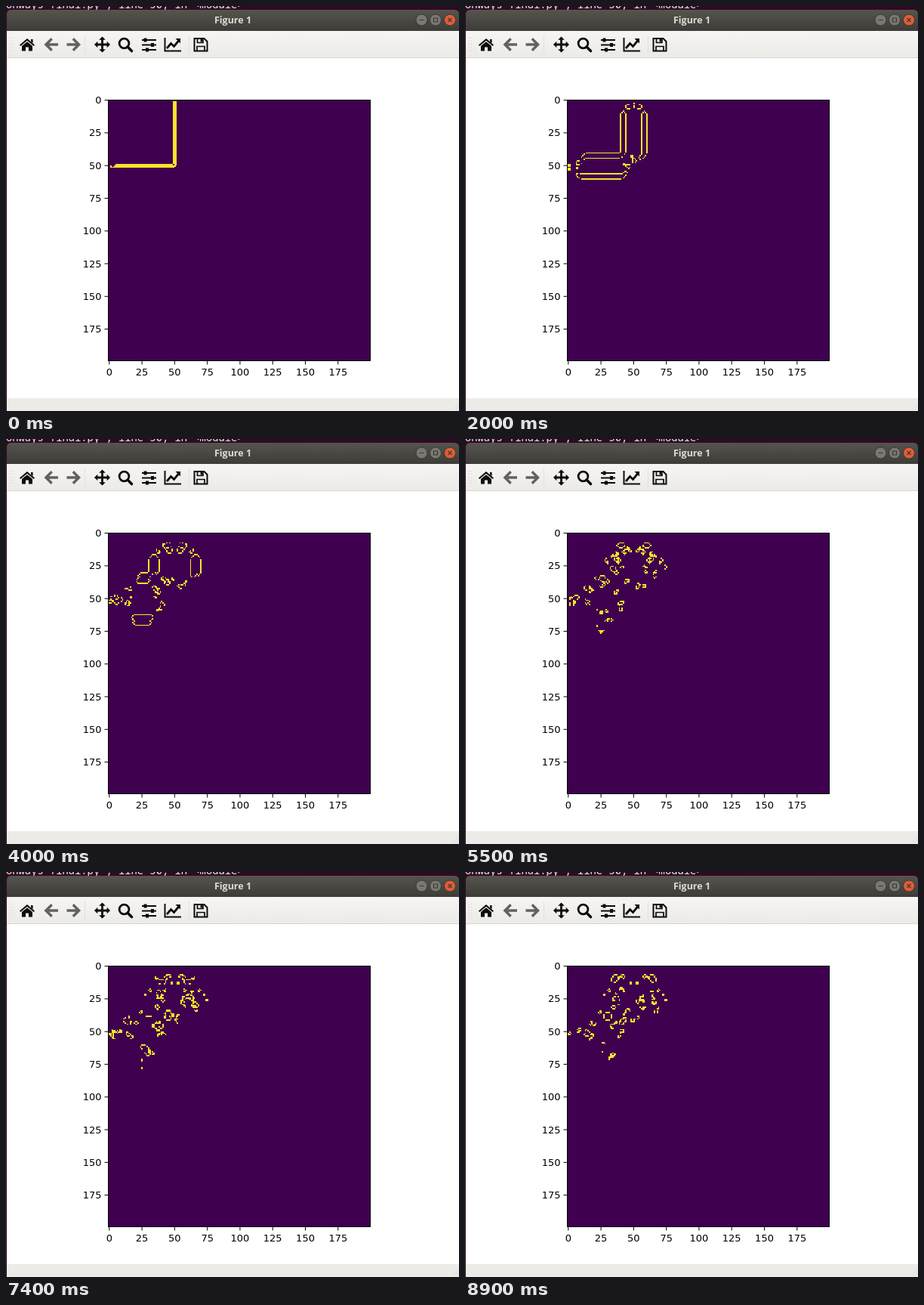
These frames come from a looping animation (600 px wide and 536 px high, 9000 ms). An HTML page with a canvas:

```html
<!DOCTYPE html>
<html lang="en">
<head>
<meta charset="utf-8">
<title>Figure 1</title>
<style>
  html, body { margin: 0; width: 100%; height: 100%; overflow: hidden; background: #300a24; }
  svg { position: absolute; left: 0; top: 0; }
  canvas { position: absolute; left: 135px; top: 124px; }
  .term { font: 13.8px "Noto Sans Mono", "DejaVu Sans Mono", monospace; fill: #eee; }
  .title { font: bold 12.5px "Open Sans", "Noto Sans", sans-serif; fill: #dfdbd2; text-anchor: middle; }
  #axes { font: 13px "DejaVu Sans", sans-serif; }
</style>
</head>
<body>
<svg width="600" height="536" viewBox="0 0 600 536">
  <defs>
    <linearGradient id="bar" x2="0" y2="1"><stop stop-color="#56544d"/><stop offset="1" stop-color="#3d3c38"/></linearGradient>
    <linearGradient id="tools" x2="0" y2="1"><stop stop-color="#f6f5f3"/><stop offset="1" stop-color="#eceae7"/></linearGradient>
  </defs>
  <rect width="600" height="536" fill="#300a24"/>
  <text class="term" x="0" y="3" xml:space="preserve">onways-final.py", line 50, in &lt;module&gt;</text>

  <!-- window -->
  <path d="M1 33V11Q1 5 7 5H594Q600 5 600 11V33Z" fill="url(#bar)"/>
  <text class="title" x="300.5" y="23">Figure 1</text>
  <g stroke="#3a3935" fill="#7a7872">
    <circle cx="550.5" cy="18.5" r="7.5"/><circle cx="569" cy="18.5" r="7.5"/>
    <circle cx="588" cy="18.5" r="7.5" fill="#e25c36"/>
    <path d="M547.5 18.5h6M566.5 16h5v5h-5zM585.5 16l5 5m0-5l-5 5" fill="none" stroke-width="1.2"/>
  </g>
  <rect x="1" y="33" width="599" height="36" fill="url(#tools)"/>
  <rect x="1" y="68" width="599" height="1" fill="#d8d5d0"/>
  <rect x="1" y="69" width="599" height="450" fill="#fff"/>
  <rect x="1" y="519" width="599" height="17" fill="#edebe8"/>
  <path d="M5.5 42v20M8.5 42v20" stroke="#d2cfca" stroke-dasharray="1 3"/>
  <path d="M104.5 39v24M242.5 39v24" stroke="#e2e0dc"/>
  <path d="M599 527l-7 7M599 531l-3 3" stroke="#c4c0ba" stroke-dasharray="1 2"/>

  <!-- toolbar icons -->
  <g fill="#0c0c0c">
    <path d="M28 43l10 8.5-1.3 1.5L28 45.8 19.3 53 18 51.5zM33 44h2.6v5L33 47z"/>
    <path d="M28 47.2l7 5.8v6.5h-5v-5h-4v5h-5V53z"/>
    <path id="arrow" fill="#626262" d="M50.5 51l9-9 2.4 2.4-4.7 4.8H69v3.6H57.2l4.7 4.8-2.4 2.4z"/>
    <use href="#arrow" transform="matrix(-1 0 0 1 149.5 0)"/>
    <path d="M127.5 40.5l4.3 4.3h-2.9v4.8h4.8v-2.9l4.3 4.3-4.3 4.3v-2.9h-4.8v4.8h2.9l-4.3 4.3-4.3-4.3h2.9v-4.8h-4.8v2.9l-4.3-4.3 4.3-4.3v2.9h4.8v-4.8h-2.9z"/>
  </g>
  <g fill="none" stroke="#0c0c0c">
    <circle cx="156.5" cy="49.5" r="6.4" stroke-width="2.8"/>
    <path d="M161 54l5.5 5.5" stroke-width="3.6" stroke-linecap="round"/>
    <path d="M180 45h19M180 51.5h19M180 58h19" stroke-width="2"/>
    <path d="M184.5 42.5v5M194 49v5M187 55.5v5" stroke-width="4"/>
    <path d="M210.5 42v17.5H232" stroke-width="2"/>
    <path d="M213 56l5.500-6.500 4 4 6.500-8" stroke-width="2.8"/>
    <path d="M249.500 43h13l4 4v12.500h-17z" stroke-width="2"/>
    <path d="M253 59v-5.500h10V59M253.500 43v5.500h7.500V43" stroke-width="1.7"/>
    <path d="M258.800 44v3.500" stroke-width="2.4"/>
  </g>
  <path d="M231 43v6.500l-6.500-6.500z" fill="#0c0c0c"/>

  <g id="axes"></g>
</svg>
<canvas id="board" width="348" height="346"></canvas>
<script>
const N = 200, W = N + 2, SCALE = 1.7315, LOOP = 9000;
const ctx = document.getElementById('board').getContext('2d');

// Axis ticks and labels
let marks = '';
for (let v = 0; v < N; v += 25) {
  const x = 136.8 + v * SCALE, y = 124.6 + v * SCALE;
  marks += `<path d="M${x} 470v4.5M135 ${y}h-4.5" stroke="#000"/>` +
    `<text x="${x}" y="489" text-anchor="middle">${v}</text>` +
    `<text x="126.5" y="${y + 4.6}" text-anchor="end">${v}</text>`;
}
document.getElementById('axes').innerHTML = marks;

// Game of Life on a board with a dead border
const at = (row, col) => (row + 1) * W + col + 1;

// Two lines meeting at (50, 50), the horizontal one with a bump near its free end
function seed() {
  const g = new Uint8Array(W * W);
  for (let i = 0; i <= 50; i++) g[at(50, i)] = g[at(i, 50)] = 1;
  g[at(49, 2)] = g[at(49, 3)] = 1;
  return g;
}

function step(g) {
  const next = new Uint8Array(W * W);
  for (let r = 0; r < N; r++) for (let c = 0; c < N; c++) {
    const k = at(r, c);
    const n = g[k - W - 1] + g[k - W] + g[k - W + 1] + g[k - 1] +
      g[k + 1] + g[k + W - 1] + g[k + W] + g[k + W + 1];
    next[k] = n === 3 || (n === 2 && g[k]) ? 1 : 0;
  }
  return next;
}

const generationAt = ms => Math.floor(1.05 + 4.84 * Math.floor(ms / 100) / 10);
const history = [seed()];
while (history.length <= generationAt(LOOP)) history.push(step(history[history.length - 1]));

const left = col => Math.round(1.2 + col * SCALE);
const top_ = row => Math.round(0.4 + row * SCALE);

function draw(g) {
  ctx.fillStyle = '#3f0050';
  ctx.fillRect(0, 0, 348, 346);
  ctx.fillStyle = '#fbe428';
  for (let r = 0; r < N; r++) for (let c = 0; c < N; c++) {
    if (g[at(r, c)]) ctx.fillRect(left(c), top_(r), left(c + 1) - left(c), top_(r + 1) - top_(r));
  }
  ctx.strokeRect(0.5, 0.5, 347, 345);
}

const start = performance.now();
let shown = -1;
function tick() {
  const gen = generationAt((performance.now() - start) % LOOP);
  if (gen !== shown) draw(history[shown = gen]);
  requestAnimationFrame(tick);
}
tick();
</script>
</body>
</html>
```
